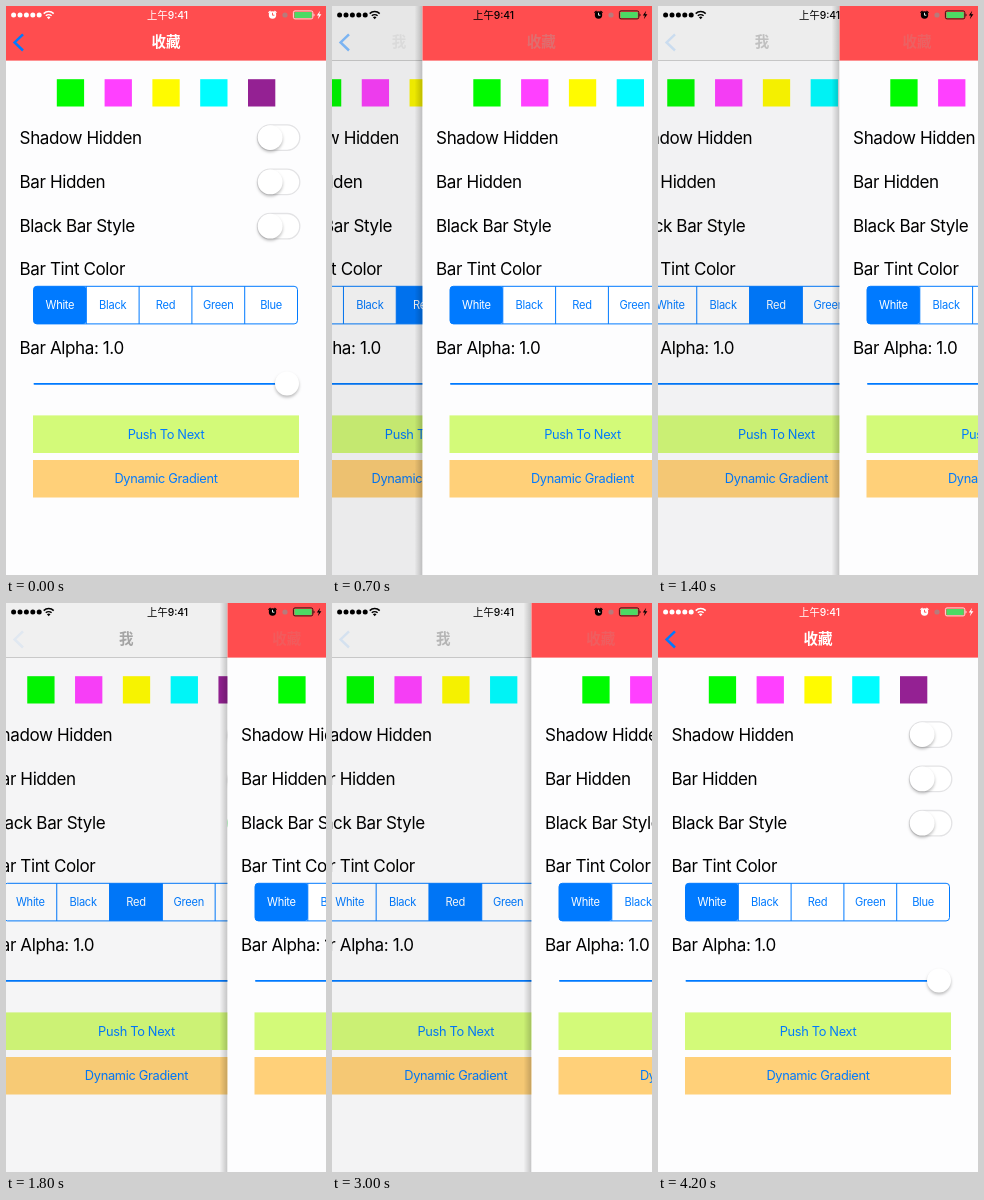
An HTML page for the animation above (4.6 s loop, 320 by 569 pixels).

```html
<!DOCTYPE html>
<html lang="zh">
<head>
<meta charset="utf-8">
<title>Swipe back</title>
<style>
  html, body { margin: 0; width: 100%; height: 100%; overflow: hidden; background: #fff; }
  svg { display: block; width: 320px; height: 569px; }
  text { font-family: Inter, "Noto Sans CJK SC", "Noto Sans CJK", sans-serif; letter-spacing: -.024em; }
  .label { font-size: 17.07px; fill: #000; }
  .seg { font-size: 11.1px; text-anchor: middle; }
  .btn { font-size: 12.8px; text-anchor: middle; fill: #007aff; }
  .title { font-size: 14.5px; font-weight: 600; text-anchor: middle; letter-spacing: 0; }
  .time { font-size: 10.3px; font-weight: 500; text-anchor: middle; letter-spacing: 0; }
  .knob { fill: #fff; filter: drop-shadow(0 2px 1.6px rgba(0, 0, 0, .26)); }
  .line { fill: none; stroke: currentColor; }
</style>
</head>
<body>
<svg viewBox="0 0 320 569">
  <defs>
    <linearGradient id="edge">
      <stop offset="0" stop-color="#000" stop-opacity="0"/>
      <stop offset="1" stop-color="#000" stop-opacity=".2"/>
    </linearGradient>
  </defs>
  <g id="under"></g>
  <rect id="dim" width="320" height="569"/>
  <g id="front"></g>
  <path id="back" d="M17 28.3 8.6 36.4 17 44.5" fill="none" stroke="#007aff" stroke-width="2.5"/>
  <text id="mine" class="title" y="41.2">我</text>
  <text id="saved" class="title" y="41.2">收藏</text>
  <g id="status" fill="currentColor">
    <g id="dots"></g>
    <path class="line" stroke-width="1.5" d="M37.7 7.6a7.2 7.2 0 0 1 10 0M39.8 9.8a4.2 4.2 0 0 1 5.8 0"/>
    <path d="M42.7 13.2 40.9 11.3a2.6 2.6 0 0 1 3.6 0z"/>
    <text class="time" x="161.6" y="12.7">上午9:41</text>
    <circle cx="266.5" cy="9" r="3.7"/>
    <path class="line" stroke-width="1.2" d="M262.5 6.8 264.6 5M268.4 5 270.5 6.8"/>
    <path id="hands" d="M266.5 6.8V9.2H268.4" fill="none" stroke-width=".9"/>
    <circle cx="279" cy="9" r="2.6" fill="#a08a8a" opacity=".75"/>
    <rect class="line" x="287.4" y="4.9" width="19.4" height="8" rx="1.6" stroke-width=".8"/>
    <rect x="288.4" y="5.9" width="17.4" height="6" rx=".8" fill="#4cd964"/>
    <path d="M307.6 7.4a1.7 1.7 0 0 1 0 3z"/>
    <path d="M314.2 4.8 310.8 9.5H312.9L311.8 13.2 315.4 8.3H313.2z"/>
  </g>
</svg>
<script>
const $ = id => document.getElementById(id);
const rect = (x, y, w, h, fill, more = '') =>
  `<rect x="${x}" y="${y}" width="${w}" height="${h}" fill="${fill}" ${more}/>`;
const text = (cls, x, y, str, more = '') =>
  `<text class="${cls}" x="${x}" y="${y}" ${more}>${str}</text>`;
const knob = (x, y, r) => `<circle class="knob" cx="${x}" cy="${y}" r="${r}"/>`;

const BLUE = '#007aff';
const SWATCHES = ['#00fb00', '#ff40ff', '#fffb00', '#00fdff', '#942193'];
const TINTS = ['White', 'Black', 'Red', 'Green', 'Blue'];
const LABELS = [['Shadow Hidden', 137.8], ['Bar Hidden', 182], ['Black Bar Style', 226.4],
  ['Bar Tint Color', 269], ['Bar Alpha: 1.0', 347.6]];

function toggle(y, on) {
  const look = on ? ['#4cd964', '#4cd964'] : ['#fff', '#e3e3e5'];
  return rect(251.4, y - 12.7, 42.4, 25.4, look[0], `rx="12.7" stroke="${look[1]}" stroke-width="1.3"`)
    + knob(on ? 281 : 264.2, y, 12.4);
}

function segments(selected) {
  const w = 52.8;
  let out = rect(27.5, 280.3, w * 5, 37.6, '#fff', `rx="3.4" stroke="${BLUE}"`);
  TINTS.forEach((name, i) => {
    const x = 27.5 + i * w, on = i === selected;
    if (on) out += rect(x, 280.3, w, 37.6, BLUE, i ? '' : 'rx="3.4"');
    if (i) out += rect(x - .5, 280.3, 1, 37.6, BLUE);
    out += text('seg', x + w / 2, 303.1, name, `fill="${on ? '#fff' : BLUE}"`);
  });
  return out;
}

function page(bar, selected, darkStyle) {
  return rect(0, 0, 320, 569, '#fdfdfe') + rect(0, 0, 320, 54.6, bar)
    + SWATCHES.map((c, i) => rect(50.8 + i * 47.8, 73.2, 27.3, 27.3, c)).join('')
    + LABELS.map(([s, y]) => text('label', 13.6, y, s)).join('')
    + toggle(131.6, false) + toggle(175.9, false) + toggle(220.2, darkStyle)
    + segments(selected)
    + rect(27.5, 376.9, 253, 1.8, BLUE, 'rx=".9"') + knob(281, 377.4, 12)
    + rect(27, 409.4, 266, 37.6, '#d3fa79') + text('btn', 160, 433, 'Push To Next')
    + rect(27, 454, 266, 37.5, '#ffd079') + text('btn', 160, 477.4, 'Dynamic Gradient');
}

$('under').innerHTML = page('#f8f8f8', 2, true) + rect(0, 54.2, 320, .6, '#b2b2b2');
$('front').innerHTML = rect(-8, 0, 8, 569, 'url(#edge)') + page('#ff4d4f', 0, false);
$('dots').innerHTML = [0, 1, 2, 3, 4].map(i => `<circle cx="${7.6 + i * 6.4}" cy="9" r="2.5"/>`).join('');

// finger path: time in ticks of 100 ms, position, speed per tick
const PATH = [[0, 0, 9], [7, 90.5, 13.3], [14, 181.5, 12], [18, 221.5, 8.5],
  [26, 268, -9], [34, 109, -20], [42, 0, 0]];

function dragAt(t) {
  if (t >= 42) return 0;
  const i = PATH.findIndex(k => k[0] > t);
  const [t0, a, va] = PATH[i - 1], [t1, b, vb] = PATH[i];
  const d = t1 - t0, u = (t - t0) / d, v = 1 - u;
  return a * v * v * (1 + 2 * u) + b * u * u * (3 - 2 * u) + d * u * v * (va * v - vb * u);
}

function draw(x) {
  const p = x / 320, q = 1 - p, idle = x === 0;
  $('front').setAttribute('transform', `translate(${x})`);
  $('under').setAttribute('transform', `translate(${-96 * q})`);
  $('dim').setAttribute('opacity', .1 * q);
  $('back').setAttribute('opacity', q ** 2.3);
  $('mine').setAttribute('x', 160 - 129.5 * q);
  $('mine').setAttribute('opacity', idle ? 0 : .03 + .85 * p ** 3);
  $('saved').setAttribute('x', 160 + .545 * x);
  $('saved').setAttribute('fill', idle ? '#fff' : '#b0a0a0');
  $('saved').setAttribute('opacity', idle ? 1 : .55 * q);
  $('status').style.color = idle ? '#fff' : '#000';
  $('hands').setAttribute('stroke', idle ? '#ff4d4f' : '#fff');
}

const start = performance.now();
function tick() {
  const ms = Math.max(0, performance.now() - start) % 4600;
  draw(dragAt(Math.floor(ms / 100)));
  requestAnimationFrame(tick);
}
tick();
</script>
</body>
</html>
```
